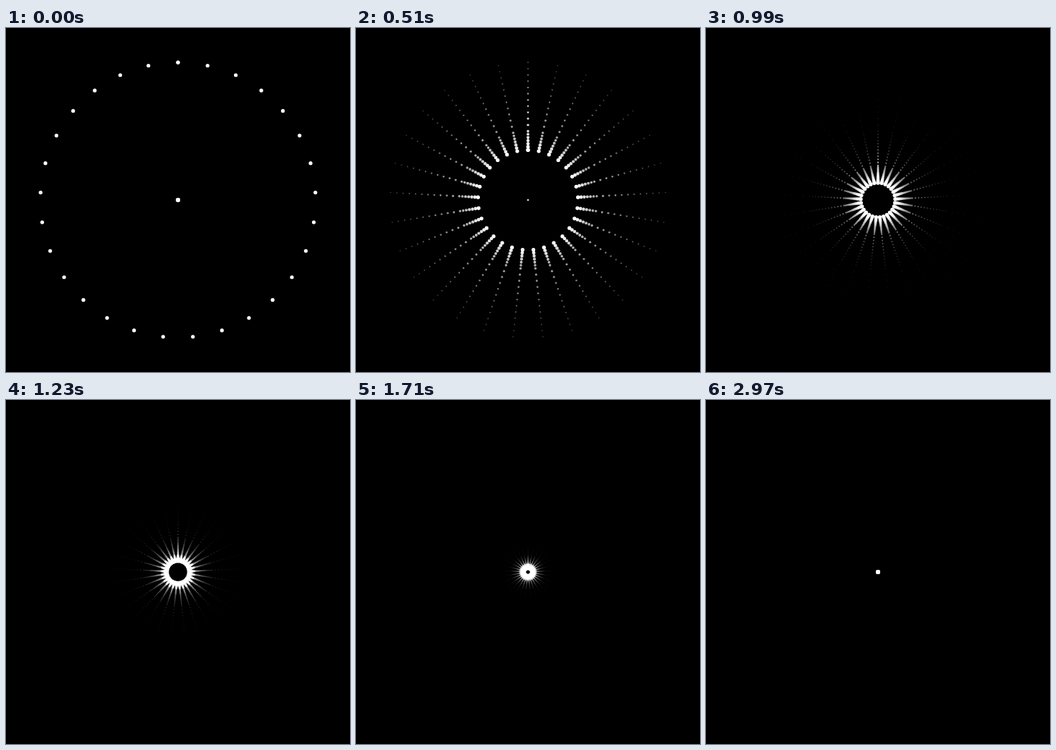
These frames come from a looping animation (480x480 px, 3000 ms). An HTML page with a canvas:

```html
<!DOCTYPE html>
<html lang="en">
<head>
<meta charset="utf-8">
<title>Converging dots</title>
<style>
  html, body { margin: 0; width: 100%; height: 100%; overflow: hidden; background: #000; }
  canvas { display: block; }
</style>
</head>
<body>
<canvas id="stage" width="480" height="480"></canvas>
<script>
const ctx = document.getElementById('stage').getContext('2d');
const DOTS = 29, TRAIL = 30, DECAY = 0.93, STEPS = 100, STEP_MS = 30;
const DOT_RADIUS = 2.6, START = 192, HALVING = 11;

// The ring's radius halves every 11 steps, linearly within each span.
function ringRadius(step) {
  const span = Math.floor(step / HALVING);
  return START / 2 ** span * (1 - step % HALVING / (2 * HALVING));
}

// The ring closes on itself, so the top dot is painted twice and looks brighter.
function drawRing(step, size) {
  const r = ringRadius(step);
  ctx.globalAlpha = size;
  for (let i = 0; i <= DOTS; i++) {
    const a = i * 2 * Math.PI / DOTS;
    ctx.beginPath();
    ctx.arc(240 + r * Math.sin(a), 240 - r * Math.cos(a), DOT_RADIUS * size, 0, 2 * Math.PI);
    ctx.fill();
  }
}

function draw() {
  const now = Math.floor(performance.now() / STEP_MS) % STEPS;
  ctx.globalAlpha = 1;
  ctx.fillStyle = '#000';
  ctx.fillRect(0, 0, 480, 480);
  ctx.fillStyle = '#fff';
  // Oldest first, so the leading ring lies on top.
  for (let age = TRAIL - 1; age >= 0; age--) {
    drawRing((now - age + STEPS) % STEPS, DECAY ** age);
  }
  requestAnimationFrame(draw);
}
draw();
</script>
</body>
</html>
```
